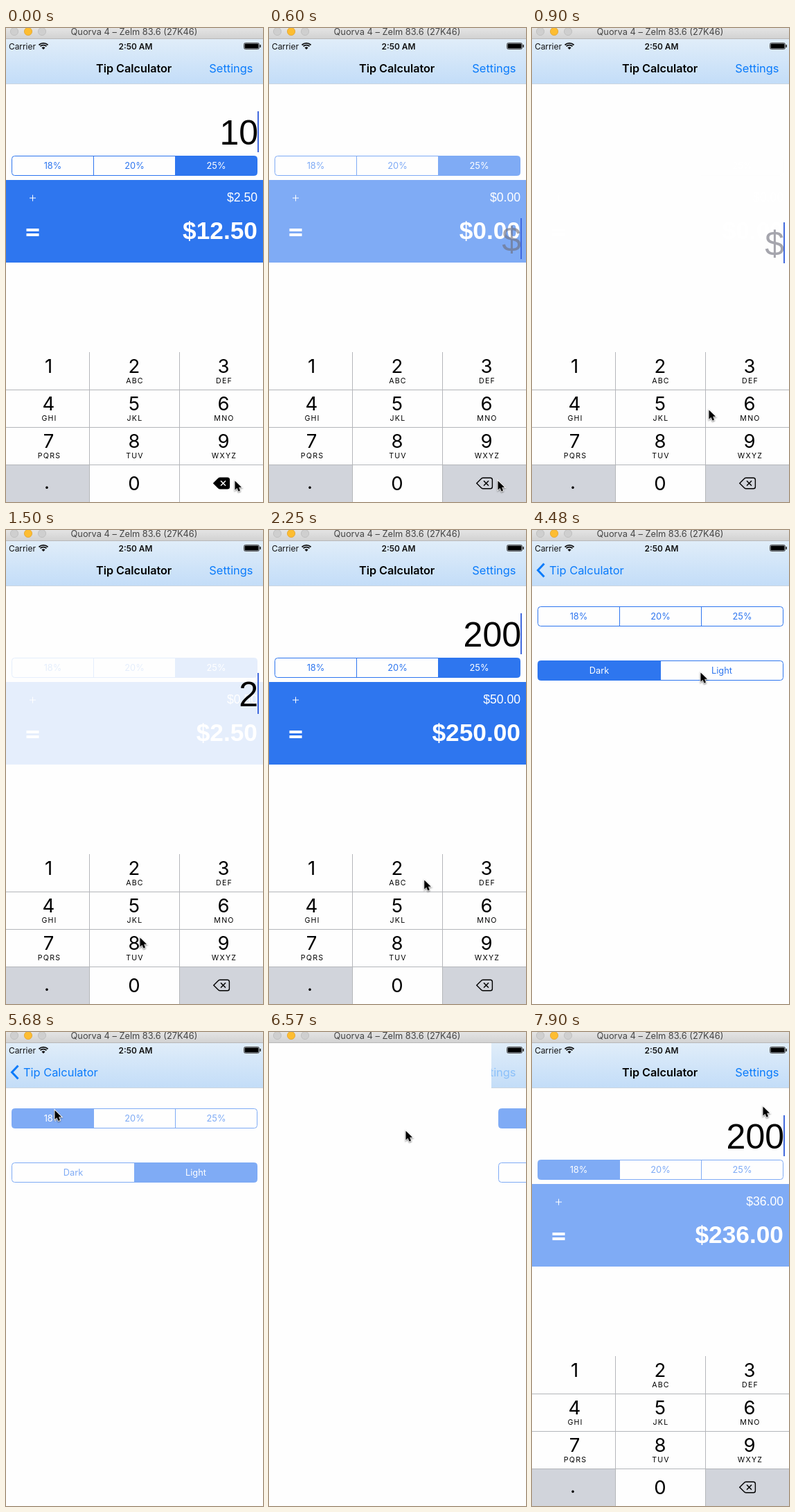
An HTML page with a canvas that plays this animation: 371 by 683 pixels, repeating every 8000 ms.

```html
<!DOCTYPE html>
<html lang="en">
<head>
<meta charset="utf-8">
<title>Tip Calculator</title>
<style>
html, body { margin: 0; width: 100%; height: 100%; overflow: hidden; background: #fefefe; }
canvas { display: block; }
</style>
</head>
<body>
<canvas id="stage" width="371" height="683"></canvas>
<script>
const W = 371, H = 683, LOOP = 8000, STEP = 149.05;
const ctx = document.getElementById('stage').getContext('2d');
const UI = 'Inter, sans-serif', NUM = '"Liberation Sans", Arial, sans-serif';
const PAPER = '#fefefe', LINK = '#0a7bfb', KEY_GREY = '#d1d4db', LINE = '#b4b6ba';
const LIGHT = 0.61;

const cursorX = [[0, 330], [4, 330], [6, 255], [8, 190], [9, 190], [10, 193], [11, 190], [14, 190], [18, 325], [19, 325],
  [20, 290], [21, 241], [23, 135], [25, 120], [28, 205], [30, 243], [33, 243], [36, 85], [37, 75], [41, 55], [42, 62],
  [43, 125], [44, 197], [46, 310], [48, 352], [50, 345], [52, 335], [53, 333]];
const cursorY = [[0, 652], [4, 652], [6, 550], [8, 490], [9, 490], [10, 587], [11, 652], [14, 652], [18, 60], [19, 60],
  [20, 110], [21, 166], [23, 202], [25, 210], [28, 230], [30, 205], [33, 205], [36, 125], [37, 125], [40, 87], [41, 60], [42, 60],
  [43, 97], [44, 142], [46, 188], [48, 199], [50, 175], [52, 122], [53, 107]];
const fieldDrop = [[2, 0], [3, 70], [4, 154], [5, 160], [8, 160], [9, 145], [10, 86], [11, 22], [12, 0]];
const panelTint = [[2, 1], [3, .9], [4, LIGHT], [5, .22], [6, 0], [9, 0], [10, .12], [11, .5], [12, .88], [13, 1], [33, 1], [34, LIGHT]];
const sheetX = [[18, W], [19, 290], [20, 95], [21, 21], [22, 3], [23, 0], [41, 0], [42, 70], [43, 230], [44, 323], [45, W]];
const amounts = [[0, '10'], [1, '1'], [3, ''], [9, '2'], [11, '20'], [13, '200']];
const pressedKeys = [[0, 'del'], [1, ''], [2, 'del'], [3, ''], [9, '2'], [10, ''], [11, '0'], [12, ''], [13, '0'], [14, '']];

function held(track, s) {
  return track.filter(([k]) => k <= s).pop()[1];
}

function eased(track, s) {
  const i = track.findIndex(([k]) => k > s);
  if (i < 0) return track[track.length - 1][1];
  if (i === 0) return track[0][1];
  const [k0, v0] = track[i - 1], [k1, v1] = track[i];
  return v0 + (v1 - v0) * (s - k0) / (k1 - k0);
}

const tint = a => `rgb(${[46, 118, 239].map(c => Math.round(254 + (c - 254) * a))})`;

function rect(x, y, w, h, color) {
  ctx.fillStyle = color;
  ctx.fillRect(x, y, w, h);
}

function text(str, x, y, font, color, align = 'left') {
  ctx.font = font;
  ctx.fillStyle = color;
  ctx.textAlign = align;
  ctx.fillText(str, x, y);
}

function faded(alpha, draw) {
  ctx.save();
  ctx.globalAlpha = alpha;
  draw();
  ctx.restore();
}

function shape(d, fill, stroke, width = 1) {
  const p = new Path2D(d);
  if (stroke) { ctx.strokeStyle = stroke; ctx.lineWidth = width; ctx.stroke(p); }
  if (fill) { ctx.fillStyle = fill; ctx.fill(p); }
}

function segments(y, labels, selected, color) {
  const x = 8.5, w = 354, h = 28, part = w / labels.length;
  ctx.save();
  ctx.beginPath();
  ctx.roundRect(x, y + .5, w, h, 4);
  ctx.strokeStyle = color;
  ctx.lineWidth = 1;
  ctx.stroke();
  ctx.clip();
  labels.forEach((label, i) => {
    const on = i === selected;
    if (on) rect(x + i * part - .5, y, part + 1, h + 1, color);
    if (i) rect(Math.floor(x + i * part - .5), y, 1, h + 1, color);
    text(label, x + (i + .5) * part, y + 19, `12.8px ${UI}`, on ? '#fff' : color, 'center');
  });
  ctx.restore();
}

function windowBar() {
  const g = ctx.createLinearGradient(0, 0, 0, 15);
  g.addColorStop(0, '#e4e4e4');
  g.addColorStop(1, '#d2d2d2');
  rect(0, 0, W, 15, g);
  rect(0, 15, W, 1, '#b8b8b8');
  [[12, '#cfcfcf', '#bcbcbc'], [32, '#fdbd31', '#e2a22c'], [52, '#cfcfcf', '#bcbcbc']].forEach(([x, fill, edge]) => {
    ctx.beginPath();
    ctx.arc(x, 5, 5.6, 0, 7);
    ctx.fillStyle = fill;
    ctx.fill();
    ctx.strokeStyle = edge;
    ctx.lineWidth = .8;
    ctx.stroke();
  });
  text('Quorva 4 – Zelm 83.6 (27K46)', 185, 10, `12.8px ${UI}`, '#444', 'center');
}

function statusBar() {
  text('Carrier', 4, 31, `11.9px ${UI}`, '#111');
  [3.6, 6.4, 9.2].forEach((r, i) => {
    ctx.beginPath();
    if (!i) ctx.moveTo(54, 31);
    ctx.arc(54, 31, r, -Math.PI * .75, -Math.PI * .25);
    ctx.strokeStyle = ctx.fillStyle = '#111';
    ctx.lineWidth = 1.8;
    i ? ctx.stroke() : ctx.fill();
  });
  text('2:50 AM', 187, 31, `600 11.9px ${UI}`, '#111', 'center');
  ctx.beginPath();
  ctx.roundRect(343.5, 21.5, 22, 9, 2);
  ctx.strokeStyle = '#555';
  ctx.lineWidth = 1;
  ctx.stroke();
  rect(344.5, 22.5, 20, 7, '#000');
  rect(366.5, 24, 1.5, 4, '#222');
}

// home: 1 on the calculator, 0 on the settings sheet
function navBar(home, popping) {
  const g = ctx.createLinearGradient(0, 16, 0, 80);
  g.addColorStop(0, '#e0edf9');
  g.addColorStop(1, '#c3ddf8');
  rect(0, 16, W, 64, g);
  rect(0, 80, W, 1, '#cbd6e0');
  statusBar();
  const titleX = 25 + 105 * home;
  faded(home, () => text('Tip Calculator', titleX, 64, `600 16.2px ${UI}`, '#000'));
  faded(1 - home, () => {
    text('Tip Calculator', titleX, 64, `16.4px ${UI}`, LINK);
    shape('M17.5 48.5L8.5 58L17.5 67.5', null, LINK, 3);
  });
  faded(home ** (popping ? 8 : 1), () => text('Settings', 356.5, 64, `16.4px ${UI}`, LINK, 'right'));
}

function calculator(s) {
  const amount = held(amounts, s), value = Number(amount);
  const picked = s >= 37 ? 0 : 2, tip = value * [.18, .2, .25][picked];
  const color = tint(eased(panelTint, s)), drop = eased(fieldDrop, s);
  const money = v => '$' + v.toFixed(2);
  rect(0, 81, W, H - 81, PAPER);
  segments(184, ['18%', '20%', '25%'], picked, color);
  rect(0, 219, W, 119, color);
  rect(34, 244.5, 9, 1, '#fff');
  rect(38, 240.5, 1, 9, '#fff');
  rect(29.5, 289, 18, 4, '#fff');
  rect(29.5, 296, 18, 4, '#fff');
  text(money(tip), 363, 250, `17.6px ${NUM}`, '#fff', 'right');
  text(money(value + tip), 363, 304, `bold 35.3px ${NUM}`, '#fff', 'right');
  text(amount || '$', 364, 168 + drop, `50px ${NUM}`, amount ? '#000' : 'rgba(110,110,122,.62)', 'right');
  rect(363, 120 + drop, 2, 59, '#4169dd');
}

function deleteIcon(pressed) {
  shape('M299.8 656L306.6 649.2Q307.6 648.2 309 648.2H319.6Q322.4 648.2 322.4 651V661Q322.4 663.8 319.6 663.8H309Q307.6 663.8 306.6 662.8Z',
    pressed ? '#000' : null, '#000', 1.4);
  shape('M310 652.5L317 659.5M317 652.5L310 659.5', null, pressed ? '#fff' : '#000', 1.5);
}

function keyboard(s, x) {
  const pressed = held(pressedKeys, s), left = [0, 121, 251], width = [120, 129, 120], mid = [61.5, 185, 314];
  const letters = ['', 'ABC', 'DEF', 'GHI', 'JKL', 'MNO', 'PQRS', 'TUV', 'WXYZ'];
  ctx.save();
  ctx.translate(x, 0);
  rect(0, 467, W, 216, LINE);
  ['1', '2', '3', '4', '5', '6', '7', '8', '9', '.', '0', 'del'].forEach((key, i) => {
    const col = i % 3, row = Math.floor(i / 3), y = 467 + row * 54 + (row ? 1 : 0);
    const grey = (key === '.' || key === 'del') !== (key === pressed);
    rect(left[col], y, width[col], row ? 53 : 54, grey ? KEY_GREY : PAPER);
    if (key === 'del') return deleteIcon(pressed === 'del');
    const baseline = row < 3 ? 497 + row * 54 : 666;
    text(key, key === '.' ? 59 : mid[col], baseline - (key === '.' ? 2 : 0), `27.5px ${UI}`, '#000', 'center');
    if (letters[i]) {
      ctx.letterSpacing = '1.2px';
      text(letters[i], mid[col] + 1, baseline + 15, `10.6px ${UI}`, '#000', 'center');
      ctx.letterSpacing = '0px';
    }
  });
  ctx.restore();
}

function settingsSheet(s, x) {
  const g = ctx.createLinearGradient(x - 6, 0, x, 0);
  g.addColorStop(0, 'rgba(0,0,0,.08)');
  g.addColorStop(1, 'rgba(0,0,0,.25)');
  rect(x - 6, 81, 6, H - 81, g);
  ctx.save();
  ctx.translate(x, 0);
  rect(0, 81, W, H - 81, PAPER);
  const color = tint(eased(panelTint, s));
  segments(110, ['18%', '20%', '25%'], s >= 37 ? 0 : -1, color);
  segments(188, ['Dark', 'Light'], s >= 34 ? 1 : s >= 25 ? 0 : -1, color);
  ctx.restore();
}

function pointer(x, y) {
  ctx.save();
  ctx.translate(x, y);
  ctx.shadowColor = 'rgba(0,0,0,.4)';
  ctx.shadowBlur = 2;
  ctx.shadowOffsetY = 1;
  const arrow = 'M.5 .5V13.5L3.5 10.8L5.6 15.6L8 14.6L6 9.8H10Z';
  shape(arrow, '#fff', '#fff', 2);
  ctx.shadowColor = 'transparent';
  shape(arrow, '#000');
  ctx.restore();
}

function draw(s) {
  const x = eased(sheetX, s), home = x / W, popping = s > 41 && x < W;
  rect(0, 0, W, H, PAPER);
  if (x > 0) {
    ctx.save();
    ctx.translate(-.3 * (W - x), 0);
    calculator(s);
    ctx.restore();
    rect(0, 81, x, 386, `rgba(0,0,0,${.1 * (1 - home)})`);
    rect(0, 467, W, 216, PAPER);
    keyboard(s, -1.1 * (W - x));
  }
  if (x < W) settingsSheet(s, x);
  navBar(home, popping);
  if (x > 0 && x < W && !popping) rect(x - 6, 16, 6, 64, 'rgba(0,0,0,.07)');
  if (popping) rect(0, 16, x - 2, H - 16, PAPER);
  if (popping) rect(x - 2, 81, 2, H - 81, PAPER);
  windowBar();
  pointer(eased(cursorX, s), eased(cursorY, s));
}

const start = performance.now();
function tick() {
  const t = (performance.now() - start) % LOOP;
  draw(Math.floor(t / STEP + .001));
  requestAnimationFrame(tick);
}
tick();
</script>
</body>
</html>
```
